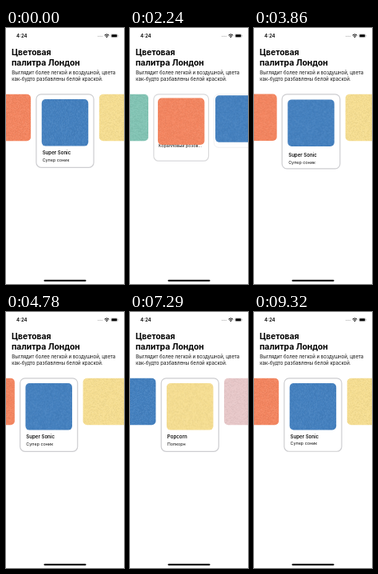
Recreate the animation shown at these times as an HTML page with a canvas. Size 148 by 320 pixels, loop 9470 ms.

```html
<!DOCTYPE html>
<html lang="ru">
<head>
<meta charset="utf-8">
<title>Цветовая палитра</title>
<style>
  html, body { margin: 0; width: 100%; height: 100%; overflow: hidden; background: #fff; }
  canvas, svg { position: absolute; left: 0; top: 0; width: 148px; height: 320px; }
  svg { font-family: Inter, "Open Sans", sans-serif; }
</style>
</head>
<body>
<canvas id="stage"></canvas>
<svg viewBox="0 0 148 320">
  <text x="13" y="11.7" font-size="6" font-weight="600">4:24</text>
  <g fill="#999">
    <circle cx="115.6" cy="10.2" r=".5"/><circle cx="117.2" cy="10.2" r=".5"/>
    <circle cx="118.8" cy="10.2" r=".5"/><circle cx="120.4" cy="10.2" r=".5"/>
  </g>
  <g fill="none" stroke="#000" stroke-width="1">
    <path d="M123.5 9.1Q126.4 6.5 129.3 9.1M124.7 10.4Q126.4 8.9 128.1 10.4"/>
  </g>
  <circle cx="126.4" cy="11.4" r=".7"/>
  <rect x="131.8" y="7.6" width="8" height="4.2" rx="1.2" fill="none" stroke="#999" stroke-width=".5"/>
  <rect x="132.4" y="8.2" width="6.8" height="3" rx=".7"/>
  <rect x="140.3" y="9" width=".5" height="1.4" fill="#999"/>
  <g font-size="10.4" font-weight="700">
    <text x="7" y="34">Цветовая</text>
    <text x="7" y="47">палитра Лондон</text>
  </g>
  <g font-size="6.1" fill="#111">
    <text x="7.2" y="58.2">Выглядит более легкой и воздушной, цвета</text>
    <text x="7.2" y="66.3">как-будто разбавлены белой краской.</text>
  </g>
  <rect x="47.5" y="314.8" width="53" height="2" rx="1"/>
</svg>
<script>
const LOOP = 9470;
const SIZE = 58.5, PAD_X = 6.8, PAD_Y = 6.3, GAP = 6.8;
const LEFT = 37.95, TOP = 82.8, EXTRA = 33, SLIDE = 70;
const OMEGA = 7.85, ZETA = 0.7;

const cards = [
  { color: '#83c5b5', title: 'Cascade', sub: 'Каскад' },
  { color: '#f58660', title: 'Coral Rose', sub: 'Коралловый розов...' },
  { color: '#4481c0', title: 'Super Sonic', sub: 'Супер соник' },
  { color: '#f7df92', title: 'Popcorn', sub: 'Попкорн' },
  { color: '#e9c9ca', title: 'Potpourri', sub: 'Попурри' }
];

// Each swipe follows the finger, may hold, then springs to a card.
const swipes = [
  { start: 1400, end: 1975, release: 1975, from: 2, to: 1, drag: 32 },
  { start: 3215, end: 3310, release: 3310, from: 1, to: 2, drag: -18 },
  { start: 4290, end: 4915, release: 4915, from: 2, to: 3, drag: -23 },
  { start: 6130, end: 6760, release: 7080, from: 3, to: 3, drag: 3 },
  { start: 7910, end: 8270, release: 8270, from: 3, to: 2, drag: 26 }
];

const canvas = document.getElementById('stage');
const ctx = canvas.getContext('2d');
const ratio = window.devicePixelRatio || 1;
canvas.width = 148 * ratio;
canvas.height = 320 * ratio;

function random(seed) {
  return () => (seed = (seed * 16807) % 2147483647) / 2147483647;
}

function makeTexture(color, seed) {
  const tile = document.createElement('canvas');
  const n = tile.width = tile.height = 60;
  const g = tile.getContext('2d');
  const rnd = random(seed);
  g.fillStyle = color;
  g.fillRect(0, 0, n, n);
  for (let i = 0; i < n * n; i++) {
    const v = rnd() - 0.5;
    g.fillStyle = v > 0 ? `rgba(255,255,255,${v * 0.16})` : `rgba(0,0,0,${-v * 0.1})`;
    g.fillRect(i % n, Math.floor(i / n), 1, 1);
  }
  return tile;
}
cards.forEach((card, i) => card.texture = makeTexture(card.color, 71 + i * 977));

function spring(ms) {
  const x = OMEGA * ms / 1000;
  const d = Math.sqrt(1 - ZETA * ZETA);
  return 1 - Math.exp(-ZETA * x) * (Math.cos(d * x) + ZETA / d * Math.sin(d * x));
}

const smooth = u => u * u * (3 - 2 * u);
const lerp = (a, b, u) => a + (b - a) * u;
const origin = index => LEFT - index * (SIZE + GAP);

function pose(t) {
  const open = cards.map(() => 0);
  const swipe = swipes.filter(s => s.start <= t).pop();
  if (!swipe) {
    open[2] = 1;
    return { x: origin(2), open };
  }
  const { start, end, release, from, to, drag } = swipe;
  if (t < release) {
    open[from] = 1;
    return { x: origin(from) + drag * smooth(Math.min(1, (t - start) / (end - start))), open };
  }
  const s = spring(t - release);
  open[from] = 1 - s;
  open[to] = from === to ? 1 : s;
  return { x: lerp(origin(from) + drag, origin(to), s), open };
}

function rounded(x, y, w, h, r) {
  ctx.beginPath();
  ctx.roundRect(x, y, w, h, r);
}

function label(text, x, y, size, weight) {
  ctx.font = `${weight} ${size}px Inter, "Open Sans", sans-serif`;
  ctx.fillText(text, x, y);
}

function drawCard(card, x, p) {
  const sx = x + PAD_X * p, sy = TOP + PAD_Y * p;
  if (p > 0.02) {
    rounded(x, TOP, SIZE + 2 * PAD_X * p, SIZE + EXTRA * p, 6);
    ctx.strokeStyle = `rgba(205,205,208,${Math.min(1, p)})`;
    ctx.lineWidth = 1.2;
    ctx.stroke();
    const shift = (p - 1) * SLIDE;
    ctx.fillStyle = '#111';
    label(card.title, sx + 0.9, 158 + shift, 6.1, 600);
    label(card.sub, sx + 0.9, 166.6 + shift, 5.4, 400);
  }
  ctx.save();
  rounded(sx, sy, SIZE, SIZE, 5);
  ctx.clip();
  ctx.drawImage(card.texture, sx - 0.75, sy - 0.75);
  ctx.restore();
}

function frame() {
  const { x, open } = pose(performance.now() % LOOP);
  ctx.setTransform(ratio, 0, 0, ratio, 0, 0);
  ctx.clearRect(0, 0, 148, 320);
  let left = x;
  cards.forEach((card, i) => {
    drawCard(card, left, open[i]);
    left += SIZE + 2 * PAD_X * open[i] + GAP;
  });
  requestAnimationFrame(frame);
}
frame();
</script>
</body>
</html>
```
